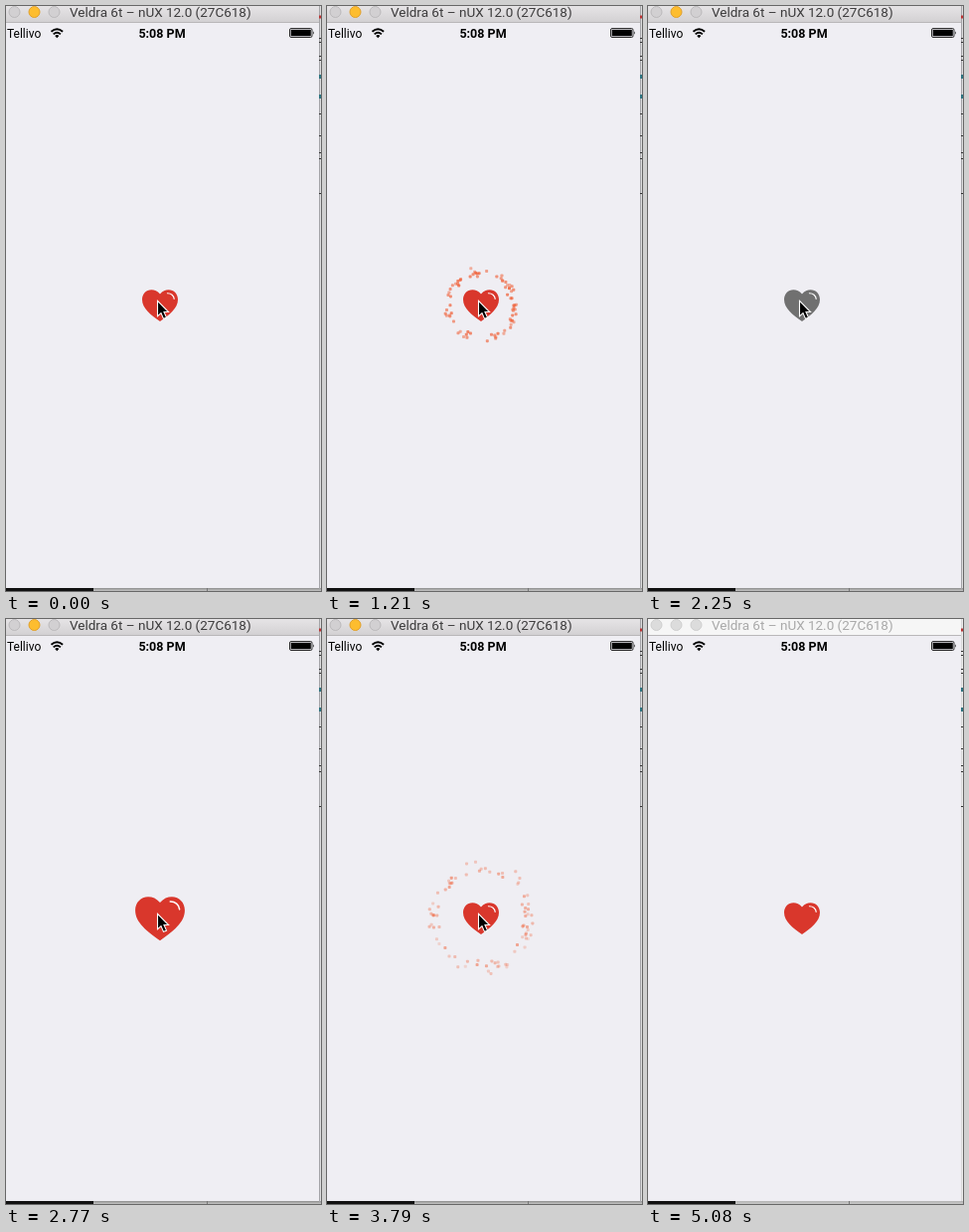
Write an HTML page that moves like this. It is 317x588 px and loops after 5.18 s.

```html
<!DOCTYPE html>
<html lang="en">
<head>
<meta charset="utf-8">
<title>Like button</title>
<style>
html, body { margin: 0; width: 100%; height: 100%; overflow: hidden; background: #efeef3; }
svg { display: block; width: 317px; height: 588px; }
text { font-family: Roboto, "Liberation Sans", sans-serif; }
.bar { fill: url(#bar); }
.knob { fill: #d2d0d2; stroke: #bbb9bb; }
.knob.mid { fill: #fdbd2f; stroke: #e0a02c; }
.title { font-size: 13.5px; fill: #3c3b3c; }
.idle .bar { fill: #f6f6f6; }
.idle .knob { fill: #dcdcdc; stroke: #cfcfcf; }
.idle .title { fill: #a9a9a9; }
.idle .shade { opacity: .35; }
</style>
</head>
<body>
<svg id="stage" viewBox="0 0 317 588">
  <defs>
    <linearGradient id="bar" x2="0" y2="1">
      <stop stop-color="#e6e4e6"/><stop offset="1" stop-color="#d3d1d3"/>
    </linearGradient>
    <linearGradient id="edge" x2="0" y2="1">
      <stop stop-color="#8e8e8e"/><stop offset="1" stop-color="#c4c4c4"/>
    </linearGradient>
  </defs>

  <!-- desktop behind the window -->
  <path fill="#f4f4f4" d="M314 0h3v588h-3z"/>
  <path fill="#c9c9c9" d="M88 585h229v3H88z"/>
  <path class="shade" fill="url(#edge)" d="M88 585h229v3H88z"/>
  <path fill="#111" d="M0 585h88v3H0z"/>
  <path fill="#777" d="M202 585h1v3h-1z"/>
  <path class="shade" fill="#a5a5a8" d="M315 0h1.3v586h-1.3z"/>
  <path stroke="#333" d="M315 32.5h2M315 36.5h2M315 50.5h2M315 54.5h2M315 108.5h2M315 130.5h2M315 147.5h2M315 153.5h2M315 188.5h2"/>
  <path stroke="#2d7480" stroke-width="4" d="M315 71h2M315 91h2"/>
  <path stroke="#b33" stroke-width="3" d="M315 11h2"/>

  <!-- window -->
  <path fill="#efeef3" d="M0 17h315v568H0z"/>
  <path class="bar" d="M0 0h315v16H0z"/>
  <path fill="#b9b7b9" d="M0 16h315v1H0z"/>
  <circle class="knob" cx="8.5" cy="6" r="5.5"/>
  <circle class="knob mid" cx="28.5" cy="6" r="5.5"/>
  <circle class="knob" cx="48.5" cy="6" r="5.5"/>
  <text class="title" x="64" y="11">Veldra 6t – nUX 12.0 (27C618)</text>

  <!-- status bar -->
  <text x="1" y="32" font-size="12">Tellivo</text>
  <g fill="none" stroke="#000" stroke-width="1.9">
    <path d="M45.5 25.8Q51.3 20.6 57.1 25.8M47.7 28.4Q51.3 25.2 54.9 28.4"/>
    <path fill="#000" stroke="none" d="M49.2 30Q51.3 28.2 53.4 30L51.3 32.2z"/>
  </g>
  <text x="157" y="32" font-size="12.5" font-weight="700" text-anchor="middle">5:08 PM</text>
  <rect x="285.5" y="22.5" width="22.5" height="9" rx="1.5" fill="none" stroke="#000" stroke-width=".8"/>
  <path d="M286.7 23.7h20.1v6.6h-20.1zM309 25.3q1.6 1.7 0 3.4z"/>

  <g id="sparks" fill="#f0562a"></g>
  <g id="heart">
    <path id="body" d="M0-11.6C-2.6-14.6-5.4-15.8-8.6-15.8C-14-15.8-18-11.6-18-6C-18 3-9.5 9.2 0 16C9.5 9.2 18 3 18-6C18-11.6 14-15.8 8.6-15.8C5.4-15.8 2.6-14.6 0-11.6z"/>
    <path fill="none" stroke="#fff" stroke-width="1.1" stroke-linecap="round" d="M7.4-12.3C11-12.4 13.9-10 14.2-6.6"/>
  </g>
  <path id="cursor" stroke="#fff" stroke-width="1.1" d="M0-.6V14.8L3.5 11.6L6 17.4L9 16.1L6.5 10.5H11z"/>
</svg>
<script>
const LOOP = 5180, CX = 155, CY = 301;
const LIKES = [20, 2505], UNLIKE = 1590, RELIKE = LIKES[1];
const POP = 620, DIP = 640, LEAVE = 3980, GONE = 4190, IDLE = 5080;
const el = id => document.getElementById(id);
const stage = el('stage'), heart = el('heart'), body = el('body');
const cursor = el('cursor'), layer = el('sparks');

let seed = 41;
const rand = (a, b) => {
  seed = seed * 16807 % 2147483647;
  return a + (b - a) * seed / 2147483647;
};

const clamp = x => Math.min(1, Math.max(0, x));
const ease = x => x * x * (3 - 2 * x);

// Eased steps through equally spaced scales
function keyed(p, scales) {
  const x = clamp(p) * (scales.length - 1);
  const i = Math.min(Math.floor(x), scales.length - 2);
  return scales[i] + (scales[i + 1] - scales[i]) * ease(x - i);
}

function heartScale(t) {
  if (t >= UNLIKE && t < RELIKE) return keyed((t - UNLIKE) / DIP, [1, .8, 1]);
  const start = t < UNLIKE ? LIKES[0] : RELIKE;
  return keyed((t - start) / POP, [1, 1.53, .8, 1]);
}

const sparks = [];
function emit(count, birth, speed, life, fade, end) {
  for (let i = 0; i < count; i++) {
    const node = document.createElementNS('http://www.w3.org/2000/svg', 'rect');
    for (const [k, v] of [['width', 3], ['height', 3], ['rx', .8]]) node.setAttribute(k, v);
    layer.append(node);
    sparks.push({
      node, fade, end,
      angle: rand(0, 2 * Math.PI), from: rand(22, 25), alpha: rand(.8, 1),
      birth: rand(...birth), speed: rand(...speed), life: rand(...life)
    });
  }
}
emit(75, [760, 930], [22, 33], [.5, .8], .9, UNLIKE);
emit(28, [2930, 3080], [60, 108], [.4, .55], 2, LOOP);
emit(82, [3050, 3270], [36, 46], [.7, 1.05], .9, LOOP);

function drawSpark(s, t) {
  const age = (t - s.birth) / 1000;
  const alpha = age < 0 || age > s.life || t > s.end ? 0 : clamp(s.alpha - s.fade * age);
  s.node.setAttribute('opacity', alpha);
  if (!alpha) return;
  const r = s.from + s.speed * age;
  s.node.setAttribute('x', CX - 1.5 + r * Math.cos(s.angle));
  s.node.setAttribute('y', CY - 1.5 + r * Math.sin(s.angle));
}

function draw(t) {
  heart.setAttribute('transform', `translate(${CX} ${CY}) scale(${heartScale(t)})`);
  body.setAttribute('fill', t >= UNLIKE && t < RELIKE ? '#707070' : '#d9372c');
  sparks.forEach(s => drawSpark(s, t));
  const p = clamp((t - LEAVE) / (GONE - LEAVE)), k = p * p;
  cursor.setAttribute('transform', `translate(${152.5 + 125 * k} ${297 + 293 * k})`);
  stage.classList.toggle('idle', t >= IDLE);
}

const begin = performance.now();
function tick() {
  draw((performance.now() - begin) % LOOP);
  requestAnimationFrame(tick);
}
tick();
</script>
</body>
</html>
```
